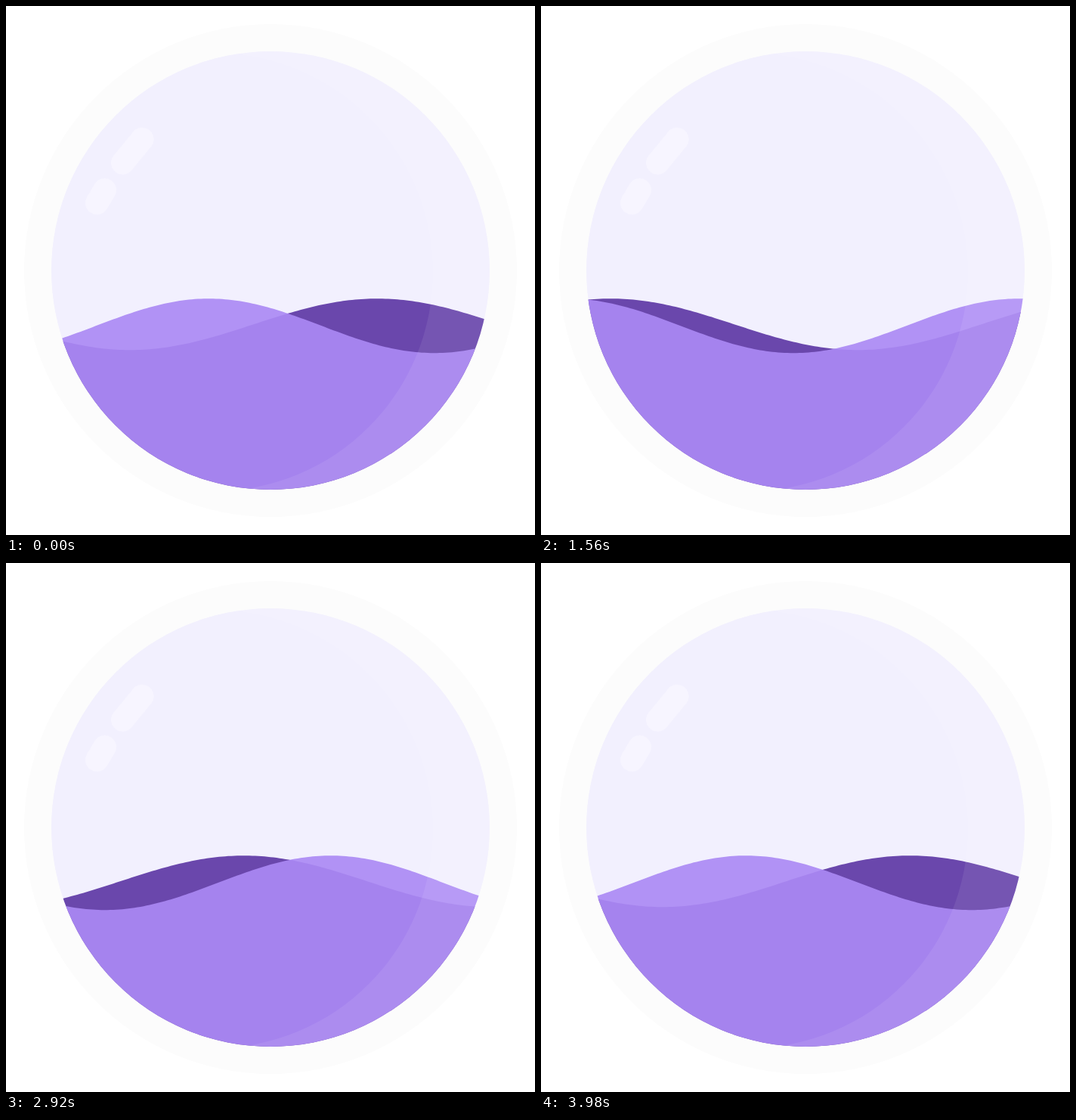
An HTML page that plays this animation: 700x700 px, repeating every 4000 ms.

```html
<!DOCTYPE html>
<html lang="en">
<head>
<meta charset="utf-8">
<title>Liquid in a glass ball</title>
<style>
html, body { margin: 0; width: 100%; height: 100%; overflow: hidden; background: #fff; }
svg { display: block; width: 100%; height: 100%; }
</style>
</head>
<body>
<svg viewBox="0 0 700 700">
  <defs>
    <clipPath id="ball"><circle cx="350" cy="350" r="290"/></clipPath>
  </defs>
  <circle cx="350" cy="350" r="326" fill="#fcfcfc"/>
  <g clip-path="url(#ball)">
    <rect width="700" height="700" fill="#f2f0fe"/>
    <path id="back" fill="#6a47ac"/>
    <path id="front" fill="rgb(171,137,245)" fill-opacity=".915"/>
    <!-- crescent: everything outside the shifted circle -->
    <path fill="#fff" fill-opacity=".075" fill-rule="evenodd"
      d="M313 0H700V700H313ZM275 62a290 290 0 0 1 0 580a290 290 0 0 1 0 -580Z" clip-path="url(#right)"/>
  </g>
  <clipPath id="right"><rect x="313" width="387" height="700"/></clipPath>
  <path d="M180 176.5L154.5 207.5M130.5 243.5L120.5 260.5" stroke="#f7f5ff" stroke-width="31" stroke-linecap="round"/>
</svg>
<script>
const LOOP = 4000;
const waves = [
  { id: 'back', crest: 491, length: 654, mid: 421.2, amp: 34, dir: 1 },
  { id: 'front', crest: 268.5, length: 597, mid: 423.2, amp: 36, dir: -1 },
];

function wavePath({ crest, length, mid, amp, dir }, p) {
  const top = crest + dir * p * length;
  let d = 'M50 700';
  for (let x = 50; x <= 650; x += 4) {
    const y = mid - amp * Math.cos((x - top) / length * 2 * Math.PI);
    d += `L${x} ${y.toFixed(2)}`;
  }
  return d + 'V700Z';
}

function draw() {
  const p = performance.now() % LOOP / LOOP;
  for (const w of waves) document.getElementById(w.id).setAttribute('d', wavePath(w, p));
  requestAnimationFrame(draw);
}
draw();
</script>
</body>
</html>
```
